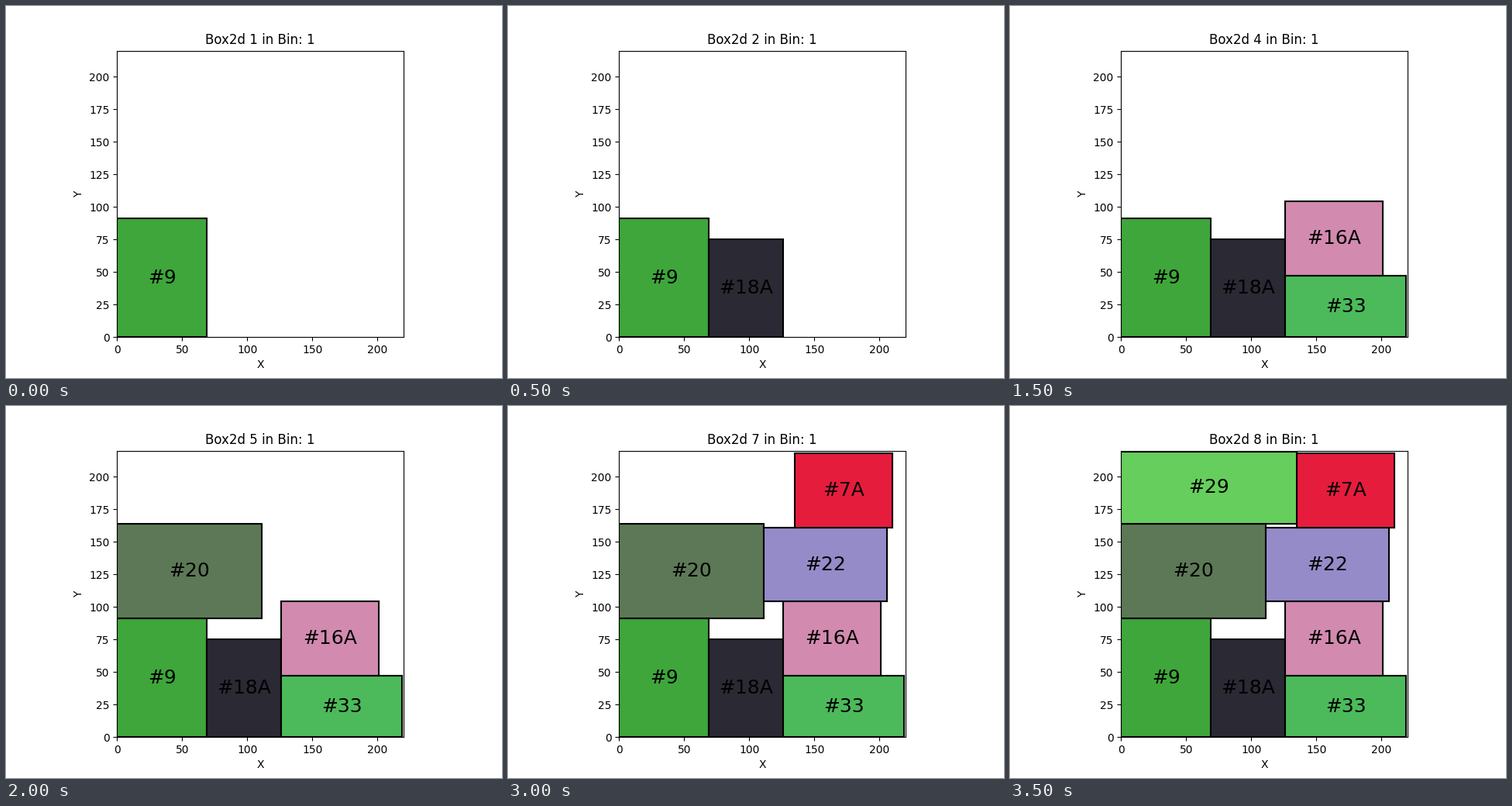
Write a matplotlib script that moves like this. It is 640 px wide and 480 px high and loops after 4000 ms.

```python
import matplotlib.pyplot as plt
from matplotlib.animation import FuncAnimation
from matplotlib.patches import Rectangle

BIN_SIZE = 220
STEP_MS = 500

# label, x, y, width, height, colour; in packing order
BOXES = [
    ("#9", 0, 0, 69, 91, "#3ea63a"),
    ("#18A", 69, 0, 57, 75, "#2b2934"),
    ("#33", 126, 0, 93, 47, "#4cba5a"),
    ("#16A", 126, 47, 75, 57, "#d28aaf"),
    ("#20", 0, 91, 111, 73, "#5d7856"),
    ("#22", 111, 104, 95, 57, "#958bc8"),
    ("#7A", 135, 161, 75, 57, "#e61c3d"),
    ("#29", 0, 164, 135, 55, "#66ce5c"),
]

plt.rcParams["font.family"] = "DejaVu Sans"
fig, ax = plt.subplots(figsize=(6.4, 4.8), dpi=100)
ax.set_aspect("equal")
ax.set_xlim(0, BIN_SIZE)
ax.set_ylim(0, BIN_SIZE)
ax.set_xticks(range(0, 201, 50))
ax.set_yticks(range(0, 201, 25))
ax.set_xlabel("X")
ax.set_ylabel("Y")
title = ax.set_title("")


def add_box(label, x, y, w, h, color):
    rect = Rectangle((x, y), w, h, facecolor=color, edgecolor="black", linewidth=1.5)
    ax.add_patch(rect)
    text = ax.text(x + w / 2, y + h / 2, label, fontsize=18,
                   color="black", ha="center", va="center")
    return rect, text


placed = [add_box(*box) for box in BOXES]


def update(step):
    for i, artists in enumerate(placed):
        for artist in artists:
            artist.set_visible(i <= step)
    title.set_text(f"Box2d {step + 1} in Bin: 1")
    return [title]


def reset():
    return update(0)


anim = FuncAnimation(fig, update, frames=len(BOXES), init_func=reset,
                     interval=STEP_MS, repeat=True, repeat_delay=0)
plt.show()
```
